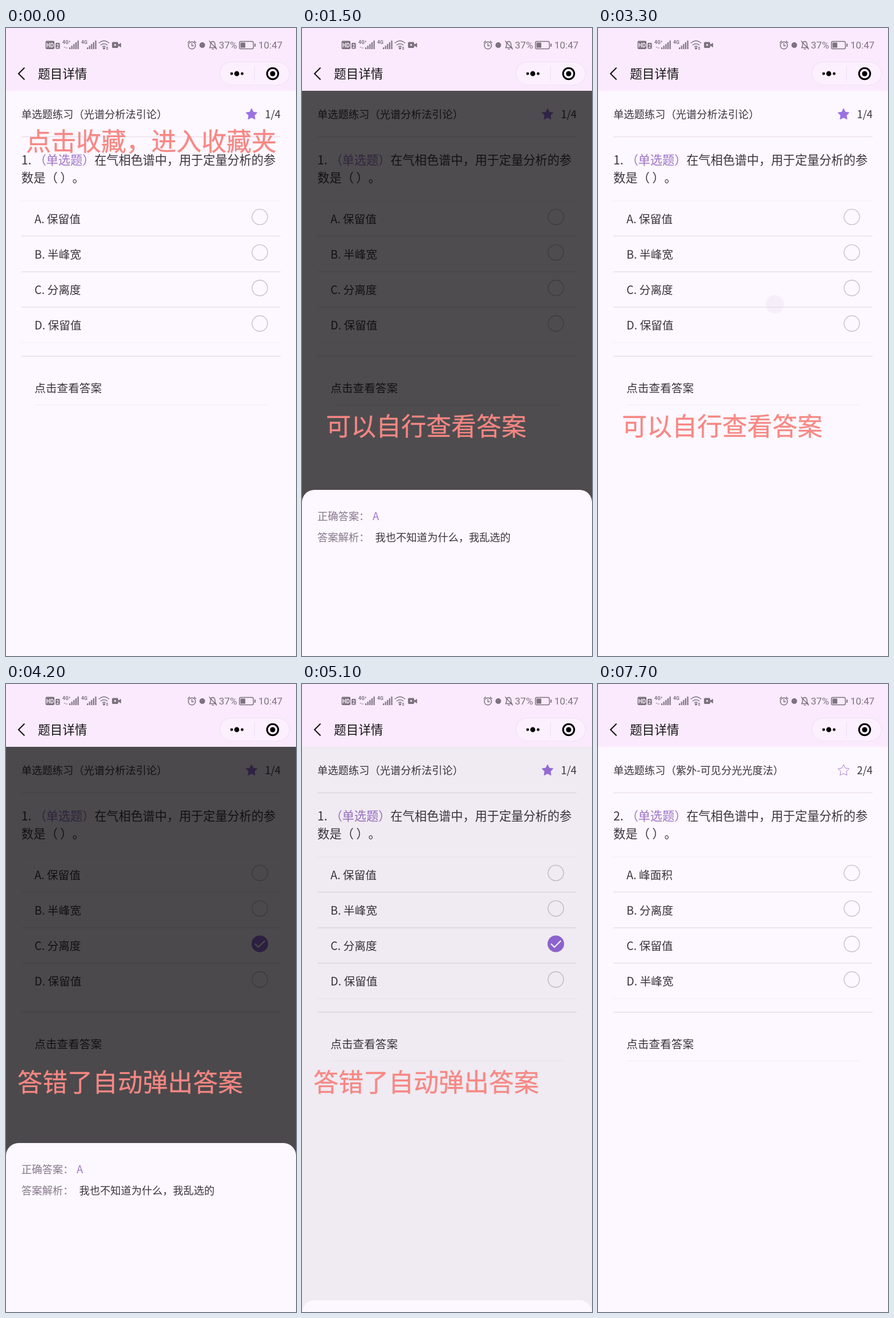
Write an HTML page that moves like this. It is 509 px wide and 1100 px high and loops after 8000 ms.

```html
<!DOCTYPE html>
<html lang="zh-CN">
<head>
<meta charset="utf-8">
<title>题目详情</title>
<style>
html, body { margin: 0; width: 100%; height: 100%; overflow: hidden; background: #fdf7ff; }
svg { display: block; width: 100%; height: 100%; }
text { font-family: "Noto Sans CJK SC", "Noto Sans CJK", sans-serif; text-spacing-trim: space-all; fill: #3b343d; }
.small { font-size: 18.3px; }
.ask { font-size: 21.2px; }
.option { font-size: 19.7px; }
.purple { fill: #9d72c6; }
.label { fill: #85798a; }
.caption { font-size: 44px; font-weight: 500; fill: #fc8683; stroke: #d98a80; stroke-opacity: .35; stroke-width: 1; }
.status { fill: #7c737f; stroke: none; font-family: Roboto, sans-serif; }
.line { fill: none; stroke: #7c737f; stroke-width: 1.5; }
</style>
</head>
<body>
<svg viewBox="0 0 509 1100" preserveAspectRatio="none">
  <rect width="509" height="1100" fill="#fdf7ff"/>

  <g id="page">
    <text id="chapter" class="small" x="27" y="158"></text>
    <path id="star"/>
    <text id="count" class="small" x="482" y="158" text-anchor="end"></text>
    <text class="ask" x="27" y="239"><tspan id="number"></tspan>. <tspan class="purple">（单选题）</tspan>在气相色谱中，用于定量分析的参</text>
    <text class="ask" x="27" y="270">数是（ ）。</text>
    <g id="options"></g>
    <path d="M27 190.5H482M27 364.5H482M27 427H482M27 489H482M27 575H482" stroke="#e9e0eb" stroke-width="1.5"/>
    <path d="M27 303H482M27 551H482M50 660H460" stroke="#f3ebf5" stroke-width="1.2"/>
    <text class="option" x="50" y="637.5">点击查看答案</text>
    <g id="check">
      <circle cx="445.500" cy="455" r="14.500" fill="#9468d8"/>
      <path d="M437 455L443 461L454.500 449.500" fill="none" stroke="#fff" stroke-width="2.200"/>
    </g>
  </g>

  <rect id="dim" y="110" width="509" height="990"/>
  <g id="panel">
    <rect width="509" height="340" rx="22" fill="#fdf7ff"/>
    <text class="small label" x="27" y="53">正确答案：</text>
    <text class="small purple" x="124" y="53">A</text>
    <text class="small label" x="27" y="90">答案解析：</text>
    <text class="small" x="128.500" y="90">我也不知道为什么，我乱选的</text>
  </g>

  <rect width="509" height="110" fill="#fbeafd"/>
  <path d="M32.500 69.500L22 80L32.500 90.500" fill="none" stroke="#111" stroke-width="2"/>
  <text x="56" y="88.300" font-size="21.600" font-weight="500" style="fill:#151017">题目详情</text>
  <rect x="375.500" y="59.500" width="122" height="40.500" rx="20.200" fill="#fdf0fe" stroke="#eedff1"/>
  <path d="M436 67V93" stroke="#eadcee"/>
  <circle cx="396" cy="80" r="2.400"/><circle cx="405" cy="80" r="4.400"/><circle cx="414.500" cy="80" r="2.400"/>
  <circle cx="468" cy="80" r="9.800" fill="none" stroke="#000" stroke-width="3"/><circle cx="468" cy="80" r="4.600"/>

  <g class="status">
    <rect x="69.500" y="22.500" width="15.500" height="14.500" rx="2"/>
    <text x="77.200" y="33.500" font-size="10" font-weight="700" text-anchor="middle" style="fill:#fbeafd;font-family:Roboto,sans-serif">HD</text>
    <rect x="87" y="26" width="7.500" height="10.500" rx="1.500"/>
    <text x="90.700" y="34.500" font-size="8.500" font-weight="700" text-anchor="middle" style="fill:#fbeafd;font-family:Roboto,sans-serif">2</text>
    <text class="status" x="99" y="28" font-size="8.500" font-weight="700">4G⁺</text>
    <text class="status" x="132" y="28" font-size="8.500" font-weight="700">4G</text>
    <path d="M103 32l2 2.500h-4zM106.500 36.500l2-2.500h-4z" opacity=".5"/>
    <g id="bars"></g>
    <circle cx="172" cy="35.500" r="2"/>
    <path d="M175.500 35l2-2.500l2 2.500zM175.500 36l2 2.500l2-2.500z"/>
    <rect x="186" y="24.500" width="11" height="10.500" rx="2"/>
    <path d="M197 29l5-3v8l-5-3z"/>
    <circle cx="191.500" cy="29.700" r="1.600" fill="#fbeafd"/>
    <circle cx="344.500" cy="30" r="5"/>
    <text class="status" x="373.500" y="36" font-size="17.300">37%</text>
    <text class="status" x="443" y="36" font-size="17">10:47</text>
    <rect x="411.500" y="25.500" width="8.500" height="9" rx="1"/>
    <rect x="436" y="27" width="2" height="6" rx="1"/>
  </g>
  <g class="line">
    <path d="M163 26.500Q172 18.500 181 26.500M166 30Q172 25 178 30M169 33Q172 30.500 175 33"/>
    <circle cx="326.300" cy="30.500" r="6.300"/>
    <path d="M326.300 26.500V31H330M318.800 26L322.500 22.500M330 22.500L333.800 26"/>
    <path d="M357.500 34.500H368.500L366.800 32V28Q366.500 24 363 23.500Q359 24 359 28V32ZM361.500 37H364.500M356.500 22.500L370 37.500"/>
    <rect x="409.700" y="23.500" width="24.500" height="13" rx="2.500"/>
  </g>

  <circle id="touch" r="16" fill="#ece2ee"/>
  <text id="caption" class="caption"></text>
</svg>
<script>
const $ = id => document.getElementById(id);
const LOOP = 8000, STEP = 100, PANEL_TOP = 804, PANEL_HEIGHT = 296;

const questions = [
  { chapter: '光谱分析法引论', options: ['保留值', '半峰宽', '分离度', '保留值'] },
  { chapter: '紫外-可见分光光度法', options: ['峰面积', '分离度', '保留值', '半峰宽'] }
];
const captions = [
  { from: 0, to: 1000, x: 35, y: 215, text: '点击收藏，进入收藏夹' },
  { from: 1000, to: 3500, x: 42, y: 714, text: '可以自行查看答案' },
  { from: 3500, to: 5500, x: 20, y: 714, text: '答错了自动弹出答案' }
];
const touches = [
  { from: 1100, to: 1450, x: 131, y: 655 },
  { from: 2300, to: 2580, x: 396, y: 742 },
  { from: 3300, to: 3600, x: 310, y: 484 },
  { from: 4700, to: 4950, x: 396, y: 742 },
  { from: 5600, to: 6000, x: 323, y: 674, dx: -137, dy: -137 }
];

const clamp = v => Math.min(1, Math.max(0, v));

// CSS "ease": cubic-bezier(.25, .1, .25, 1)
function ease(x) {
  x = clamp(x);
  let lo = 0, hi = 1, u;
  for (let i = 0; i < 24; i++) {
    u = (lo + hi) / 2;
    if (.75 * u * (1 - u) + u ** 3 < x) lo = u; else hi = u;
  }
  return .3 * u * (1 - u) ** 2 + 3 * u * u * (1 - u) + u ** 3;
}

function panelOpen(t) {
  const slide = start => ease((t - start) / 300);
  if (t < 3600) return slide(1250) - slide(2382);
  return 1 - slide(4897);
}

const starPath = Array.from({ length: 10 }, (_, i) => {
  const a = i * Math.PI / 5, r = i % 2 ? 5.2 : 10.3;
  return `${431 + r * Math.sin(a)} ${151.5 - r * Math.cos(a)}`;
}).join('L');
$('star').setAttribute('d', `M${starPath}Z`);
$('star').setAttribute('stroke-linejoin', 'round');

$('bars').innerHTML = [111, 142].map(x => [0, 1, 2, 3, 4].map(i =>
  `<rect x="${x + i * 3.6}" y="${34 - i * 3}" width="2.2" height="${3 + i * 3}"/>`).join('')).join('');

$('options').innerHTML = [0, 1, 2, 3].map(i =>
  `<text class="option" x="50" y="${341.5 + i * 62.3}"></text>
   <circle cx="445.5" cy="${331 + i * 62.2}" r="13.6" fill="none" stroke="#c9c0cc" stroke-width="1.4"/>`).join('');
const optionTexts = $('options').querySelectorAll('text');

let shown = -1;
function showQuestion(n) {
  if (n === shown) return;
  shown = n;
  const q = questions[n];
  $('chapter').textContent = `单选题练习（${q.chapter}）`;
  $('count').textContent = `${n + 1}/4`;
  $('number').textContent = n + 1;
  optionTexts.forEach((el, i) => el.textContent = `${'ABCD'[i]}. ${q.options[i]}`);
  $('star').setAttribute('fill', n ? 'none' : '#9b70df');
  $('star').setAttribute('stroke', n ? '#a97fd0' : '#9b70df');
}

function draw(t) {
  showQuestion(t < 5700 ? 0 : 1);
  $('check').setAttribute('visibility', t >= 3500 && t < 5700 ? 'visible' : 'hidden');

  const open = panelOpen(t);
  $('dim').setAttribute('opacity', .7 * open);
  $('panel').setAttribute('transform', `translate(0 ${PANEL_TOP + PANEL_HEIGHT * (1 - open)})`);

  const active = item => t >= item.from && t < item.to;
  const c = captions.find(active);
  $('caption').textContent = c ? c.text : '';
  if (c) {
    $('caption').setAttribute('x', c.x);
    $('caption').setAttribute('y', c.y);
  }

  const p = touches.find(active);
  $('touch').setAttribute('opacity', p ? .4 * clamp((p.to - t) / 150) : 0);
  if (p) {
    const k = (t - p.from) / (p.to - p.from);
    $('touch').setAttribute('cx', p.x + (p.dx || 0) * k);
    $('touch').setAttribute('cy', p.y + (p.dy || 0) * k);
  }
}

function tick() {
  draw(Math.floor(performance.now() % LOOP / STEP) * STEP);
  requestAnimationFrame(tick);
}
tick();
</script>
</body>
</html>
```
